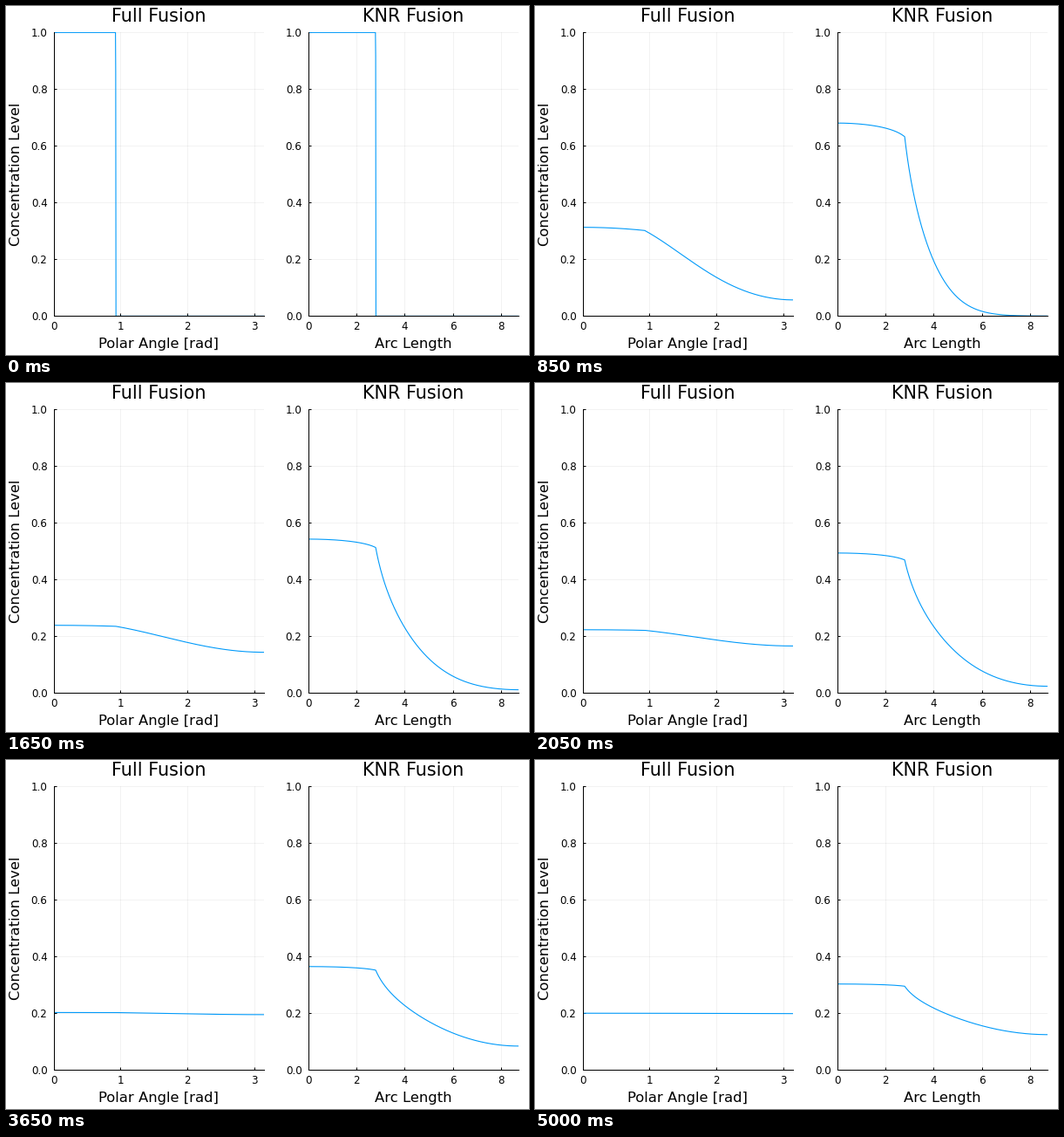
Animation of 600x400 px, one loop 5050 ms. Source, as a matplotlib script:

```python
import numpy as np
import matplotlib.pyplot as plt
from matplotlib.animation import FuncAnimation

W, H, DPI = 600, 400, 100
FRAMES, STEP_MS = 101, 50
BLUE = "#009afa"

plt.rcParams["font.family"] = "DejaVu Sans"


def pt(px):
    return px * 72 / DPI


class Diffusion:
    """Diffusion along a surface of revolution with two diffusivities."""

    def __init__(self, split, end, radius, d_in, d_out, n_in=140, n_out=280):
        edges = np.r_[np.linspace(0, split, n_in + 1),
                      np.linspace(split, end, n_out + 1)[1:]]
        mid = (edges[1:] + edges[:-1]) / 2
        half = np.diff(edges) / 2
        diff = np.where(mid < split, d_in, d_out)
        area = radius(mid) * 2 * half
        resist = half / diff
        flow = radius(edges[1:-1]) / (resist[1:] + resist[:-1])

        stiff = np.diag(np.r_[flow, 0] + np.r_[0, flow])
        stiff -= np.diag(flow, 1) + np.diag(flow, -1)
        self.root = np.sqrt(area)
        self.rate, self.modes = np.linalg.eigh(
            stiff / np.outer(self.root, self.root))
        self.coef = self.modes.T @ (self.root * (mid < split))

        self.n_in = n_in
        self.weight = resist[n_in] / (resist[n_in] + resist[n_in - 1])
        self.x = np.r_[0, mid[:n_in], split, mid[n_in:], end]

    def at(self, t):
        u = self.modes @ (self.coef * np.exp(-self.rate * t)) / self.root
        k = self.n_in
        joint = self.weight * u[k - 1] + (1 - self.weight) * u[k]
        return np.r_[u[0], u[:k], joint, u[k:], u[-1]]


def opened_sphere(r, neck):
    """Radius and opening angle of a sphere opened at constant area."""
    height = np.sqrt(4 * r * r - neck * neck)
    new_r = 2 * r * r / height
    return new_r, np.arcsin(neck / new_r)


# one merged sphere, measured by polar angle
cap = np.arccos(0.6)
full = Diffusion(cap, np.pi, np.sin, 0.155, 0.0295)

# spheres of radius 1 and 2 joined by a narrow neck
NECK = 0.4
r1, open1 = opened_sphere(1, NECK)
r2, open2 = opened_sphere(2, NECK)
joint = r1 * (np.pi - open1)
total = joint + r2 * (np.pi - open2)


def pair_radius(s):
    return np.where(s < joint, r1 * np.sin(s / r1),
                    r2 * np.sin(open2 + (s - joint) / r2))


pair = Diffusion(joint, total, pair_radius, 0.75, 0.0712)

fig = plt.figure(figsize=(W / DPI, H / DPI), dpi=DPI, facecolor="white")


def label(x, y, text, size, **kw):
    fig.text(x / W, 1 - y / H, text, fontsize=pt(size), ha="center", **kw)


def panel(left, end, ticks, title, xlabel):
    width, top, base = 241.4, 30.4, 355.4
    ax = fig.add_axes([left / W, 1 - base / H, width / W, (base - top) / H])
    ax.set_xlim(0, end)
    ax.set_ylim(0, 1)
    ax.set_xticks(ticks)
    ax.set_yticks(np.linspace(0, 1, 6))
    ax.spines[["top", "right"]].set_visible(False)
    ax.spines[["left", "bottom"]].set_linewidth(pt(1))
    ax.tick_params(direction="in", length=pt(3), width=pt(1),
                   labelsize=pt(11.9))
    ax.tick_params(axis="x", pad=pt(5.6))
    ax.tick_params(axis="y", pad=pt(7))
    ax.grid(color="black", alpha=0.1, linewidth=pt(0.5))
    ax.set_axisbelow(True)
    center = left + width / 2
    label(center, 18.5, title, 20.8, va="baseline")
    label(center, 392, xlabel, 16.35, va="baseline")
    return ax.plot([], [], color=BLUE, linewidth=pt(1.1))[0]


curves = [
    (panel(54.6, np.pi, range(4), "Full Fusion", "Polar Angle [rad]"), full),
    (panel(346.6, total, range(0, 9, 2), "KNR Fusion", "Arc Length"), pair),
]
label(12, 193, "Concentration Level", 16.35, va="center", rotation=90)


def draw(i):
    for line, model in curves:
        line.set_data(model.x, model.at(i))
    return [line for line, _ in curves]


anim = FuncAnimation(fig, draw, frames=FRAMES, interval=STEP_MS,
                     repeat=True, repeat_delay=0)
plt.show()
```
